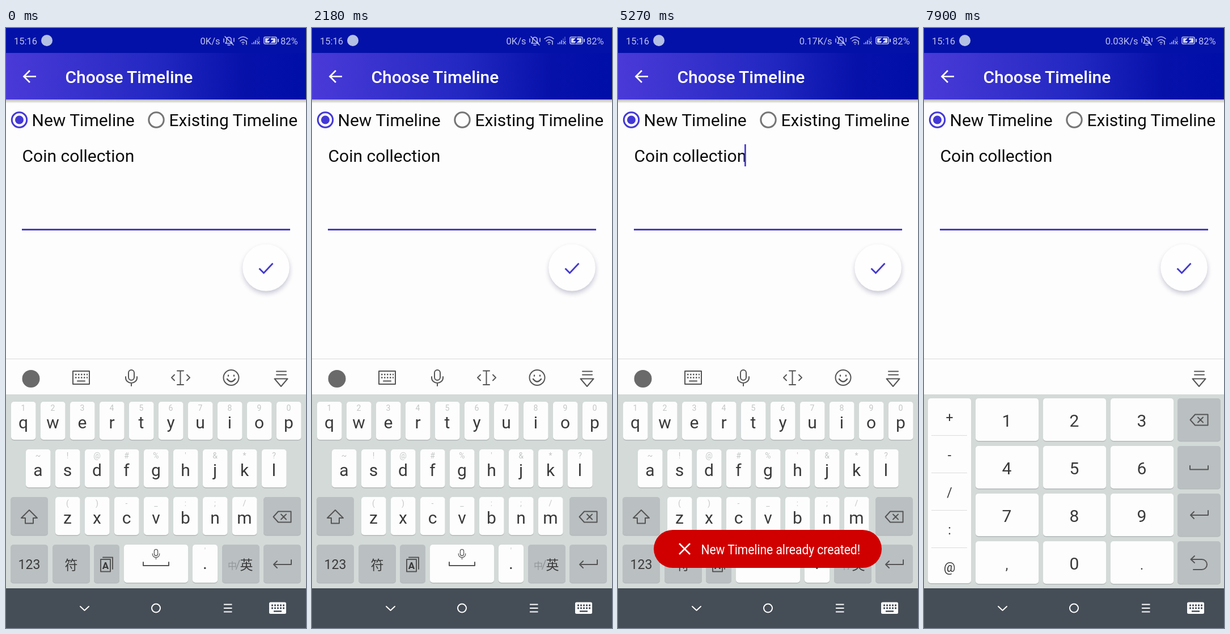
Recreate the animation shown at these times as an HTML page. Size 529 by 1058 pixels, loop 8000 ms.

```html
<!DOCTYPE html>
<html lang="en">
<head>
<meta charset="utf-8">
<title>Choose Timeline</title>
<style>
html, body { margin: 0; width: 100%; height: 100%; overflow: hidden; background: #fdfdfd; }
svg { display: block; width: 100vw; height: 100vh; }
text { font-family: Roboto, "Noto Sans CJK SC", "Noto Sans CJK JP", "Noto Sans CJK", sans-serif; }
.mid { text-anchor: middle; }
.line { fill: none; stroke: #555; stroke-width: 2; stroke-linecap: round; stroke-linejoin: round; }
.white { stroke: #fff; }
.status { fill: #bcc3ea; font-size: 16.5px; }
.body { font-size: 30px; fill: #0c0c0c; }
.key { font-size: 30px; fill: #3a3a3a; }
.small { font-size: 23px; fill: #3a3a3a; }
.hint { font-size: 14px; fill: #c3c7c5; }
.condensed { font-size: 24px; fill: #fff; transform: translate(146.5px, 927.5px) scaleX(.875); }
</style>
</head>
<body>
<svg viewBox="0 0 529 1058" preserveAspectRatio="none">
  <defs>
    <linearGradient id="bar">
      <stop offset="0" stop-color="#4a3ad8"/><stop offset=".5" stop-color="#2328c2"/>
      <stop offset=".8" stop-color="#0611aa"/><stop offset="1" stop-color="#000fa8"/>
    </linearGradient>
    <linearGradient id="barShadow" x2="0" y2="1">
      <stop offset="0" stop-color="#000" stop-opacity=".28"/><stop offset="1" stop-color="#000" stop-opacity="0"/>
    </linearGradient>
    <filter id="soft" x="-30%" y="-30%" width="160%" height="160%"><feGaussianBlur stdDeviation="4"/></filter>
    <g id="backspace" class="line"><path d="M-15.500 0L-7-9.500H15.500V9.500H-7ZM-2-4.500L7 4.500M7-4.500L-2 4.500"/></g>
    <g id="enter" class="line"><path d="M16-7V1H-15M-9-5L-15 1L-9 7"/></g>
    <g id="mic" class="line">
      <rect x="-5" y="-14" width="10" height="18" rx="5"/><path d="M-10-2V0A10 9 0 0 0 10 0V-2M0 9V14"/>
    </g>
  </defs>

  <rect width="529" height="1058" fill="#fdfdfd"/>

  <!-- status bar -->
  <rect width="529" height="44" fill="#0311a8"/>
  <text class="status" x="14" y="28.500">15:16</text>
  <circle cx="72" cy="22" r="10" fill="#b4bfe4"/>
  <text class="status" id="speed" x="377.500" y="28.500" text-anchor="end"></text>
  <g class="line" style="stroke:#bcc3ea;stroke-width:1.500">
    <path d="M387 27H399L397 24V19A4.500 5 0 0 0 389 19V24ZM391 30H395M386 15L401 30M384 19V25M402 18V24"/>
    <path d="M410 19Q418 12 426 19M413 23Q418 18 423 23M416 26Q418 24 420 26M418 28V29M424 23V29"/>
    <path d="M434 27V28M437 25V28M440 22V28" /><path d="M443 19V23M446 16V22" opacity=".45"/><path d="M443 24L447 28M447 24L443 28"/>
    <rect x="455" y="16" width="22" height="12" rx="2"/><path d="M480 20V24" stroke-width="2"/>
  </g>
  <rect x="457" y="18" width="18" height="8" fill="#d8dcf4"/>
  <path d="M468 15L460 23H465L463 29L472 21H467Z" fill="#0311a8"/>
  <text class="status" x="484" y="28.500">82%</text>

  <!-- app bar -->
  <rect y="126" width="529" height="7" fill="url(#barShadow)"/>
  <rect y="44" width="529" height="82" fill="url(#bar)"/>
  <path class="line white" style="stroke-width:2.700;stroke-linecap:butt;stroke-linejoin:miter" d="M53 85.500H31.500M42 75L31.500 85.500L42 96"/>
  <text x="104.500" y="97" font-size="30" font-weight="500" fill="#fff">Choose Timeline</text>

  <!-- form -->
  <circle cx="23.500" cy="162" r="13.200" fill="none" stroke="#4338d4" stroke-width="3"/>
  <circle cx="23.500" cy="162" r="7.500" fill="#4338d4"/>
  <text class="body" x="45.500" y="173">New Timeline</text>
  <circle cx="265" cy="162" r="13.200" fill="none" stroke="#757575" stroke-width="3"/>
  <text class="body" x="287.500" y="173">Existing Timeline</text>
  <text class="body" x="28.500" y="236">Coin collection</text>
  <rect id="caret" x="223" y="205" width="2.700" height="39" fill="#4338d4"/>
  <rect x="28" y="354" width="473" height="3" fill="#483cbe"/>
  <circle cx="459" cy="427" r="41" fill="#39396a" opacity=".28" filter="url(#soft)"/>
  <circle cx="458.500" cy="422.500" r="41.300" fill="#fefefe"/>
  <path class="line" style="stroke:#4338d4;stroke-width:2.800;stroke-linecap:butt;stroke-linejoin:miter" d="M446.500 424L454.500 432L470.500 415"/>

  <!-- keyboard -->
  <rect y="583" width="529" height="1" fill="#dadada"/>
  <rect y="646" width="529" height="342" fill="#d3dad8"/>
  <path class="line" d="M477 605.500H494M477 611.500H494M473.500 618.500H496.500L485 632Z"/>
  <g id="letters"></g>
  <g id="numbers"></g>

  <!-- navigation bar -->
  <rect y="988" width="529" height="70" fill="#454d56"/>
  <g class="line white">
    <path d="M131 1020L138.500 1027L146 1020"/><circle cx="264.500" cy="1023" r="7.500"/>
    <path style="stroke-linecap:butt" d="M384 1016.500H398.500M384 1023H398.500M384 1029.500H398.500"/>
  </g>
  <rect x="464" y="1012.500" width="30" height="20.500" rx="2.500" fill="#fff"/>
  <path d="M468 1018H491M468 1023H491" stroke="#454d56" stroke-width="3" stroke-dasharray="3 2"/>
  <path d="M472 1028.500H486" stroke="#454d56" stroke-width="2.500"/>

  <g id="toast">
    <rect x="63" y="885" width="402" height="67" rx="33.500" fill="#d00000"/>
    <path class="line white" style="stroke-width:2.600;stroke-linecap:butt" d="M108 909L127 928M127 909L108 928"/>
    <text class="condensed">New Timeline already created!</text>
  </g>
</svg>
<script>
const byId = id => document.getElementById(id);
const LOOP = 8000;
const CARET_ON = [[110, 570], [1030, 1600], [2290, 2520], [3090, 3550], [4010, 4580], [5040, 5500], [6070, 6640], [7100, 7560]];
const NUMBERS_FROM = 6410;

const key = (x, y, w, h, dark) =>
  `<rect x="${x}" y="${y + 1.5}" width="${w}" height="${h}" rx="5" fill="#b3baba"/>` +
  `<rect x="${x}" y="${y}" width="${w}" height="${h}" rx="5" fill="${dark ? '#babfc1' : '#fdfdfd'}"/>`;
const label = (x, y, text, style = 'key') => `<text class="mid ${style}" x="${x}" y="${y}">${text}</text>`;
const line = (d, width = 2) => `<path class="line" style="stroke-width:${width}" d="${d}"/>`;
const use = (id, x, y, scale = 1) => `<use href="#${id}" transform="translate(${x} ${y}) scale(${scale})"/>`;

function letterPad() {
  const rows = [[9, 659, 'qwertyuiop', '1234567890'], [35, 743, 'asdfghjkl', "~!@#%'&*?"], [87, 827, 'zxcvbnm', '()-_:;/']];
  let out = '<circle cx="44" cy="618.5" r="15.5" fill="#6a6a6a"/>' +
    line('M118 605H147V628H118ZM126 622.500H139') +
    '<path d="M122 611H144M122 616.500H144" stroke="#555" stroke-width="2.500" stroke-dasharray="2.500 2.500"/>' +
    use('mic', 221, 617) +
    line('M297 611.500L292 616.500L297 621.500M319 611.500L324 616.500L319 621.500M302 604.500H313M302 629H313M307.500 604.500V629') +
    '<circle class="line" cx="397" cy="616.500" r="13.500"/>' + line('M390 619Q397 628 404 619M392 612.500V613.500M402 612.500V613.500', 2.4);
  for (const [left, top, chars, hints] of rows) {
    [...chars].forEach((char, i) => {
      const x = left + i * 52, mid = x + 21.5;
      out += key(x, top, 43.5, 67) + label(mid, top + 47, char) +
        label(mid, top + 16, hints[i] === '&' ? '&amp;' : hints[i], 'hint');
    });
  }
  out += key(8, 827, 66, 67, true) + line('M41 850L55 864H48V873.500H34V864H27Z');
  out += key(454, 827, 66, 67, true) + use('backspace', 487, 862);
  const bottom = [[8, 66, 1], [82, 66, 1], [155, 45, 1], [208, 113, 0], [329, 44, 0], [381, 66, 1], [454, 66, 1]];
  for (const [x, w, dark] of bottom) out += key(x, 911, w, 67, dark);
  out += label(41, 954, '123', 'small') + label(115, 955, '符', 'small') +
    line('M167 937H184V958.500H167ZM171 933.500H188V954') +
    '<text class="mid" x="175.500" y="954" font-size="17" font-weight="700" fill="#3a3a3a">A</text>' +
    use('mic', 264.5, 928, .62) + line('M242 942V948H287V942') +
    label(351, 954, '.') + label(351, 927, "'", 'hint') +
    '<text class="mid" x="399" y="954" font-size="16" fill="#91979a">中</text>' +
    '<text class="mid" x="409" y="954" font-size="22" fill="#91979a">/</text>' +
    label(424, 955, '英', 'small') + use('enter', 487, 945);
  return out;
}

function numberPad() {
  let out = key(7, 653, 76, 326);
  [...'+-/:@'].forEach((char, i) => {
    out += label(45, 694.5 + i * 66, char, 'small');
    if (i) out += `<rect x="13" y="${652 + i * 66}" width="63" height="1" fill="#dcdcdc"/>`;
  });
  ['123', '456', '789', ',0.'].forEach((row, r) => {
    const top = 653 + r * 84;
    [...row].forEach((char, c) => {
      const x = 91 + c * 119;
      out += key(x, top, 111, 75) + label(x + 55, top + 50, char, /\d/.test(char) ? 'key' : 'small');
    });
    out += key(447, top, 76, 75, true);
  });
  return out + use('backspace', 485, 691) + line('M469 772V778.500H501V772') + use('enter', 485, 858) +
    line('M477 931L470.500 937L477 943M471 937H490A9 9 0 0 1 490 955H475');
}

byId('letters').innerHTML = letterPad();
byId('numbers').innerHTML = numberPad();

function toastOpacity(t) {
  if (t < 2980 || t >= 6750) return 0;
  if (t < 3210) return .92 + .08 * (t - 2980) / 230;
  const fade = Math.max(0, (t - 6415) / 335);
  return 1 - fade * fade;
}

const show = (id, visible) => byId(id).setAttribute('visibility', visible ? 'visible' : 'hidden');

function draw(now) {
  const t = now % LOOP;
  show('caret', CARET_ON.some(([from, to]) => t >= from && t < to));
  show('letters', t < NUMBERS_FROM);
  show('numbers', t >= NUMBERS_FROM);
  byId('toast').setAttribute('opacity', toastOpacity(t));
  byId('speed').textContent = t < 2520 ? '0K/s' : t < 5610 ? '0.17K/s' : '0.03K/s';
  requestAnimationFrame(draw);
}
draw(performance.now());
</script>
</body>
</html>
```
